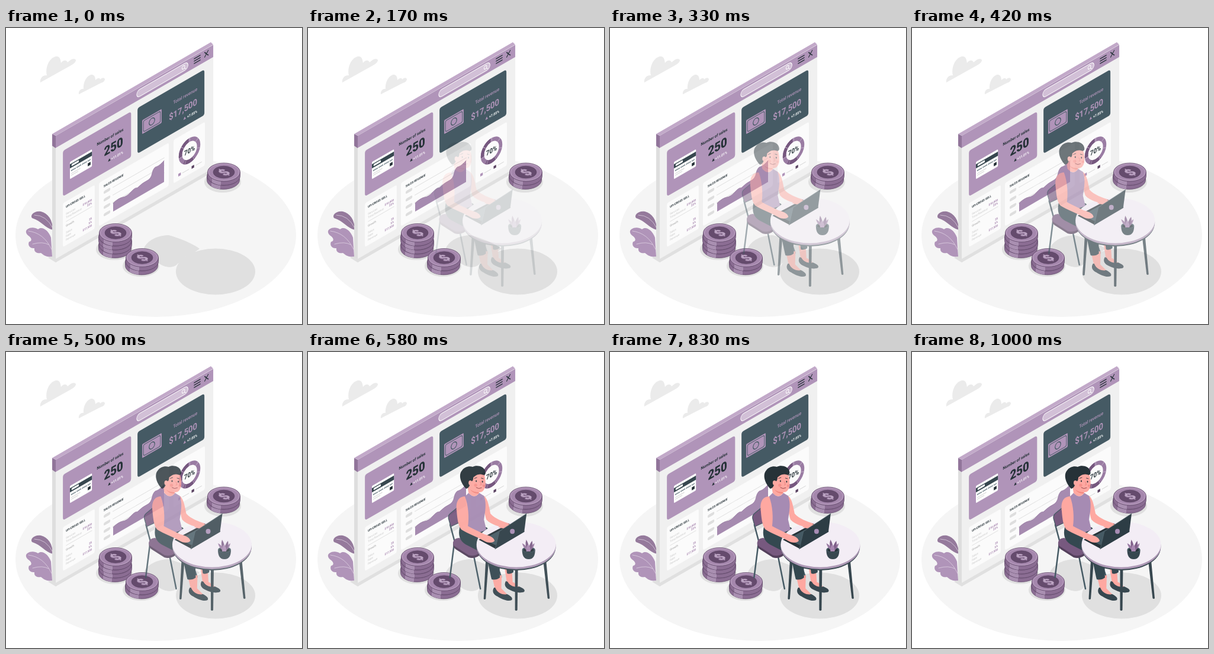
These frames come from a looping animation (500 by 500 pixels, 1040 ms). An HTML page:

```html
<!DOCTYPE html>
<html lang="en">
<head>
<meta charset="utf-8">
<title>Sales dashboard</title>
<style>
  html, body { margin: 0; height: 100%; overflow: hidden; background: #fff; }
  svg { display: block; width: 100vw; height: 100vh; }
  text { font-family: Roboto, "Open Sans", sans-serif; font-weight: 700; }
  .dark { fill: #263238; }
  .slate { fill: #37474f; }
  .purple { fill: #b094b9; }
  .skin { fill: #fea8a1; }
  .line { fill: none; stroke-linecap: round; stroke-linejoin: round; }
  .end { text-anchor: end; }
  .row { font-size: 4.9px; }
  .faint text { fill: #c9c9c9; font-weight: 400; }
  .heavy { font-weight: 900; }
</style>
</head>
<body>
<svg viewBox="0 0 500 500">
  <ellipse cx="253" cy="350" rx="237" ry="138" fill="#f5f5f5"/>
  <g fill="#ebebeb">
    <path d="M58 92C57 85 62 79 69 80C66 66 73 51 84 48C91 47 92 53 93 59C97 53 103 54 104 58C111 51 118 51 118 55C117 59 113 61 110 63Z"/>
    <path d="M123 112C122 106 127 102 131 103C130 93 135 82 143 79C149 78 151 83 151 88C155 84 159 84 159 87C163 83 167 84 167 87C166 91 163 92 160 93Z"/>
  </g>

  <!-- ground shadows -->
  <g fill="#e0e0e0">
    <path d="M71 388L84 396L355 240L350 234L84 384Z"/>
    <path d="M233 372C238 360 255 350 275 350C300 357 320 367 327 373L290 398C284 406 270 405 262 400L248 391Z"/>
    <ellipse cx="354" cy="411.500" rx="67" ry="39"/>
    <ellipse cx="183" cy="374" rx="31" ry="18"/>
    <ellipse cx="228" cy="402" rx="31" ry="18"/>
    <ellipse cx="366" cy="260" rx="31" ry="18"/>
  </g>

  <!-- leaves -->
  <path d="M79 341C66 338 60 326 44 321C40 316 48 308 59 310C71 313 79 324 79 341Z" fill="#957a9c"/>
  <path d="M78 386C68 388 63 383 59 380C53 381 47 379 48 372C41 373 36 367 39 361C45 360 43 354 38 351C34 348 32 343 36 340C42 336 49 337 54 340C61 334 72 342 76 354Z" fill="#b094b9"/>
  <path d="M48 316Q68 316 79 338M38 343Q64 346 77 374M45 365Q62 360 72 366" class="line" stroke="#e6dae9" stroke-width=".7"/>

  <!-- window slab -->
  <path d="M78 179L84 182V390L78 386Z" fill="#dedede"/>
  <path d="M78 179L84 182V203L78 199Z" fill="#91759a"/>
  <path d="M78 179L346 24L350 28L84 182Z" fill="#c2a9c9"/>

  <!-- window front, drawn flat and sheared -->
  <g transform="matrix(.866 -.5 0 1 84 182)">
    <rect width="307.200" height="208" fill="#f0f0f0"/>
    <rect width="307.200" height="20.500" fill="#b094b9"/>
    <rect x="158" y="3.500" width="100" height="12" rx="6" fill="#d2c0d7" stroke="#fff"/>
    <g class="line" stroke="#fff"><circle cx="249" cy="9" r="2.700"/><path d="M251 11l2.500 2.500"/></g>
    <path d="M270 5h12M270 9h12M270 13h12M290.500 4.500l7 8M297.500 4.500l-7 8" class="line" stroke="#263238" stroke-width="1.400"/>

    <!-- number of sales -->
    <rect x="14" y="32.500" width="133" height="77" rx="4" class="purple"/>
    <g class="end dark">
      <text x="132" y="57.500" font-size="7">Number of sales</text>
      <text x="131.500" y="82" font-size="21.500" class="heavy">250</text>
      <text x="131.500" y="95.500" font-size="6" fill="#fff">+11.01%</text>
      <path d="M102 95l2.500-4.500 2.500 4.500z"/>
    </g>
    <rect x="27.700" y="58" width="43" height="29" rx="1.500" fill="#fff"/>
    <path d="M27.700 62h43v7h-43z" class="slate"/>
    <rect x="31" y="63.500" width="14" height="3.600" rx="1" fill="#fff"/>
    <path d="M30 74h38" stroke="#455a64" stroke-width="1.800" stroke-dasharray="1.600 .8 1.600 .8 1.600 .8 1.600 2"/>
    <path d="M30 79h18M30 82h14" stroke="#d0d0d0"/>
    <rect x="62.500" y="78" width="5.500" height="5" class="dark"/>

    <!-- total revenue -->
    <rect x="159.500" y="33" width="130.500" height="77" rx="4" fill="#455a64"/>
    <rect x="168.600" y="58" width="38" height="23.500" rx="1.500" class="purple"/>
    <g class="line" stroke="#455a64"><rect x="171" y="60.500" width="33.200" height="18.500" rx="3"/><circle cx="187.600" cy="69.700" r="5.500" stroke-width="1.400"/></g>
    <g class="end purple">
      <text x="276" y="61.500" font-size="7.800" style="font-weight:500">Total revenue</text>
      <text x="276" y="85" font-size="15">$17,500</text>
      <text x="276" y="98.500" font-size="6" fill="#fff">+7.05%</text>
      <path d="M249 98l2.500-4.500 2.500 4.500z"/>
    </g>

    <!-- up/cross sell -->
    <rect x="14" y="121" width="62" height="74" rx="3" fill="#fbfbfb"/>
    <text x="20" y="132" font-size="5.100" class="dark">UP/CROSS SELL</text>
    <path d="M20 155h51" stroke="#dcdcdc" stroke-width=".8"/>
    <g class="row faint">
      <text x="20" y="144">Services</text><text x="20" y="150">Total Revenue</text>
      <text x="20" y="164" style="fill:#999">Growth</text><text x="20" y="175.500">Sales</text>
      <text x="20" y="181.500">Rate</text><text x="20" y="187.500">Revenue</text>
    </g>
    <g class="row end" fill="#a583ad">
      <text x="70.500" y="145">$10,000</text><text x="70.500" y="150.500">25%</text>
      <text x="70.500" y="176">25</text><text x="70.500" y="182">5%</text><text x="70.500" y="188">$17,500</text>
    </g>

    <!-- sales chart -->
    <rect x="84.300" y="122" width="136.200" height="73" rx="3" fill="#fbfbfb"/>
    <text x="93.500" y="134" font-size="5.100" class="dark">SALES REVENUE</text>
    <path d="M96 143h8M96 156h8M96 168.500h8M96 181h8" class="line" stroke="#dedede" stroke-width="5"/>
    <path d="M111 143h101M111 156h101M111 168.500h101" stroke="#dedede" stroke-width=".9"/>
  </g>
  <path d="M181 310V296Q190 287 197 286T211 277T222 270Q231 261 238 258T247 245T255 234Q260 232 267 224V260Z" fill="#a68bb0"/>
  <path d="M181 296Q190 287 197 286T211 277T222 270Q231 261 238 258T247 245T255 234Q260 232 267 224" class="line" stroke="#90709a" stroke-width=".7"/>
  <g transform="matrix(.866 -.5 0 1 84 182)">
    <rect x="229.800" y="122" width="61.200" height="73.500" rx="3" fill="#fbfbfb"/>
    <g transform="translate(261 155.400) rotate(-90)" fill="none" stroke-width="6.500">
      <circle r="17.800" stroke="#9a7ca3"/>
      <circle r="17.800" stroke="#76587f" pathLength="100" stroke-dasharray="18 12 26 44" stroke-dashoffset="-42"/>
      <circle r="17.800" stroke="#d7c8db" pathLength="100" stroke-dasharray=".6 13.690"/>
    </g>
    <text x="261" y="159.300" font-size="11.300" text-anchor="middle" class="dark">70%</text>
    <path d="M239 184h5v4.500h-5z" class="purple"/><path d="M265 184h5v4.500h-5z" fill="#5b4463"/>
    <path d="M247 186.500h13M273 186.500h12" stroke="#d5d5d5" stroke-width="1.200"/>
  </g>

  <g id="coins"></g>

  <!-- woman, chair and table -->
  <g id="desk">
    <path d="M249 322L241.500 381M281 340L293 400M322 362L328 380M242 292L250 322" class="line" stroke="#455a64" stroke-width="2.500"/>
    <path d="M239 281Q238 276 243 272L254 263L258 288L243 295Z" fill="#77597f" stroke="#455a64" stroke-width="1.200"/>
    <path d="M247 322Q248 316 257 315L291 330V344Q282 350 273 347L251 333Q246 329 247 322Z" fill="#54405c"/>
    <path d="M247 321Q248 315 257 314L291 328V340Q282 346 273 343L251 329Q246 326 247 321Z" fill="#77597f"/>

    <!-- legs and shoes -->
    <path d="M334 366L338 391L348 396L346 366Z" class="skin"/>
    <path d="M336 387C332 394 336 399 343 402C350 406 361 408 367 405C370 401 363 398 358 396C351 398 342 394 339 388Z" class="slate"/>
    <path d="M340 389C343 395 351 398 358 396L349 389Z" class="skin"/>
    <path d="M313 380L318 402L328 410L329 377Z" class="skin"/>
    <path d="M316 398C312 404 315 410 322 413C330 418 340 422 346 419C349 415 342 411 338 409C330 410 321 405 318 398Z" class="slate"/>
    <path d="M319 399C321 406 330 411 338 409L327 398Z" class="skin"/>
    <path d="M258 296C255 309 258 319 268 325L297 340C306 346 307 364 312 384Q320 386 326 381C324 362 328 348 334 342L338 374Q343 376 349 372L346 330L303 296Z" fill="#344850"/>

    <!-- table -->
    <g class="slate">
      <path d="M302 352L298.500 417Q300 419 302 417L307 352Z"/>
      <path d="M351.500 362L351.500 436Q353.500 438 355.500 436L356.500 362Z"/>
      <path d="M399 352L406.500 416Q408.500 418 410 416L404 352Z"/>
      <ellipse cx="353.500" cy="330.500" rx="66.500" ry="38.500"/>
    </g>
    <ellipse cx="353.500" cy="328.500" rx="67" ry="38.500" fill="#ad98b5"/>
    <ellipse cx="353.500" cy="325" rx="67" ry="38.500" fill="#f3edf5"/>

    <!-- right arm and torso -->
    <path d="M297 242C305 245 307 258 310 273C318 282 331 286 342 290L340 297C326 296 311 292 303 283C299 271 299 258 297 242Z" class="skin"/>
    <path d="M267 244L273 238Q283 249 291 238L299 243C304 256 301 270 299 283L303 300C292 307 276 307 263 301C268 285 263 262 267 244Z" fill="#a68bb3"/>
    <path d="M273 238Q283 249 291 238L289 230L271 226Z" class="skin"/>
    <path d="M275 231Q281 238 290 236L290 239Q281 240 275 231Z" fill="#f2887f"/>

    <!-- head -->
    <path d="M272 206Q288 197 299 206Q303 217 301 228Q298 238 290 237Q277 235 272 228Z" class="skin"/>
    <path d="M269 231C260 222 255 208 262 200C266 194 274 192 280 194C287 190 299 193 301 201C303 207 299 209 296 207C290 205 284 209 281 212C281 217 279 219 277 219C275 222 276 229 269 231Z" class="dark"/>
    <ellipse cx="276" cy="221" rx="3" ry="4" class="skin"/>
    <g fill="#f2827d"><circle cx="285" cy="225" r="2.600" opacity=".6"/><circle cx="299" cy="226" r="2" opacity=".6"/></g>
    <ellipse cx="286" cy="218" rx="1" ry="1.500" class="dark"/><ellipse cx="296.500" cy="219" rx="1" ry="1.500" class="dark"/>
    <g class="line" stroke="#263238" stroke-width=".9">
      <path d="M283 213.500l4-1.500M294.500 213l3.500 1"/>
      <path d="M286 229Q290 232 295 229.500" stroke="#8e3f45"/>
      <path d="M292.500 219l2 5-2 .8" stroke="#e8817c"/>
    </g>

    <!-- laptop and left arm -->
    <path d="M290 317L318 332L368 303L341 290Z" class="dark"/>
    <path d="M298 316L318 326L352 306L334 297Z" fill="#455a64"/>
    <path d="M267 244C256 244 251 253 253 269C254 283 256 295 261 300C272 307 287 312 299 319C305 323 314 323 317 319C316 313 308 310 300 308C291 303 280 299 272 294C274 280 273 260 267 244Z" class="skin"/>
    <path d="M332 293Q340 288 343 292L334 298Q326 298 323 295Z" class="skin"/>
    <path d="M318 333L325 303L371 273L367 304Z" fill="#2d3d45"/>
    <path d="M318 333L325 303L371 273" class="line" stroke="#52666f" stroke-width=".8"/>
    <ellipse cx="347" cy="303" rx="4" ry="4.200" fill="#a68bb3"/>

    <!-- plant -->
    <g transform="translate(374.500 334)">
      <path d="M-11 0C-11 10-8 16 0 16S11 10 11 0Z" class="slate"/>
      <ellipse rx="11" ry="5" fill="#455a64"/><ellipse cy=".5" rx="9" ry="3.700" class="dark"/>
      <path d="M-2 2Q-9-3-11-11Q-4-8-1 1M2 2Q9-3 10-11Q4-8 1 1" fill="#9a7aa3"/>
      <path d="M-2 2Q-7-8-4-17Q1-9 1 2M-1 2Q1-10 6-15Q8-6 3 2" fill="#80618a"/>
      <path d="M-4 3Q-5-5-1-9Q4-4 3 3Z" fill="#a888b1"/>
    </g>
  </g>
</svg>
<script>
const coin = (x, y) => `<g transform="translate(${x} ${y})" stroke="#5b4463" stroke-width=".7">
  <path d="M-27.500 0v6.600a27.500 15.500 0 0 0 55 0v-6.600z" fill="#8b6d93"/>
  <path d="M-20 10.600v6.600q7 4 15 4.700v-6.600q-8-.7-15-4.700z" fill="#a98fb1" stroke="none"/>
  <ellipse rx="27.500" ry="15.500" fill="#a587ad"/>
  <ellipse rx="25.500" ry="14" fill="none" stroke="#c3abc9"/>
  <ellipse rx="18" ry="10.300" fill="#654b6d"/></g>`;

function stack(x, y, count) {
  let out = '';
  for (let i = count - 1; i >= 0; i--) out += coin(x - (i % 2), y + i * 6.8);
  const sign = (dy, fill) => `<text class="heavy" transform="matrix(.866 -.4 .866 .5 ${x} ${y + dy})"
    y="8" font-size="22" text-anchor="middle" fill="${fill}">$</text>`;
  return out + sign(1.2, '#8b6d93') + sign(0, '#bda5c4');
}

document.getElementById('coins').innerHTML =
  stack(368, 243.5, 2) + stack(185, 346, 4) + stack(230, 388, 2);

const desk = document.getElementById('desk');
const LOOP = 1040, STEP = 1000 / 24;

const bezier = (a, b, u) => 3 * (1 - u) ** 2 * u * a + 3 * (1 - u) * u * u * b + u ** 3;

// cubic-bezier(.36, -.01, .5, 1.38): overshoots, then settles
function ease(p) {
  let lo = 0, hi = 1;
  for (let i = 0; i < 24; i++) {
    const mid = (lo + hi) / 2;
    if (bezier(.36, .5, mid) < p) lo = mid; else hi = mid;
  }
  return bezier(-.01, 1.38, hi);
}

const start = performance.now();

function draw(now) {
  const t = Math.max(0, now - start) % LOOP;
  const n = Math.floor((t + 3.4) / STEP);
  const k = n < 2 ? 0 : ease(Math.min(1, (n * STEP + 40) / 1000));
  desk.setAttribute('opacity', Math.max(0, Math.min(1, k)));
  desk.setAttribute('transform', `translate(${30 * (k - 1)} 0)`);
  requestAnimationFrame(draw);
}
draw(start);
</script>
</body>
</html>
```
